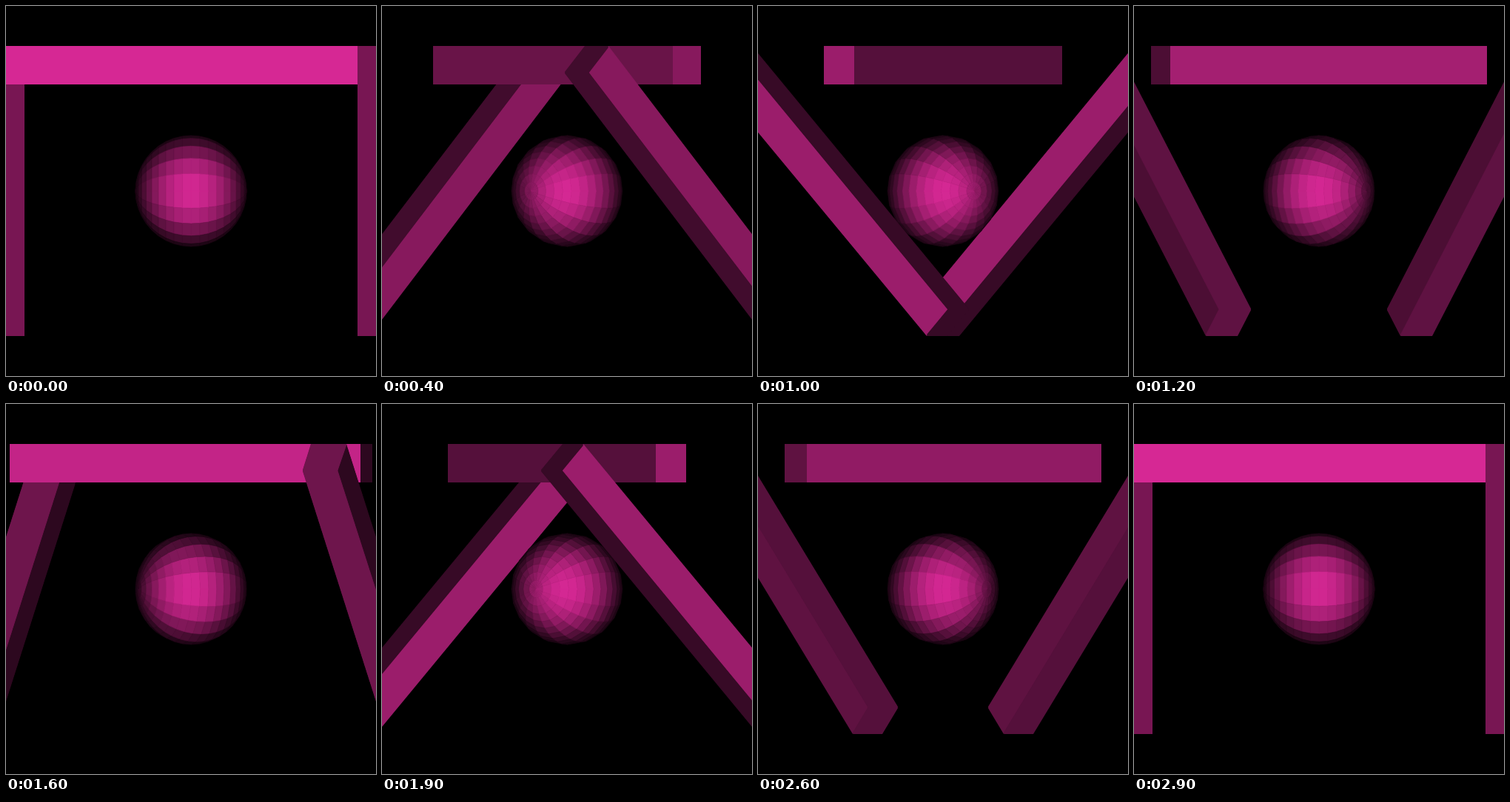
An HTML page with a canvas that plays this animation: 500 by 500 pixels, repeating every 3 s.

```html
<!DOCTYPE html>
<html lang="en">
<head>
<meta charset="utf-8">
<title>Turning bars and sphere</title>
<style>
  html, body { margin: 0; width: 100%; height: 100%; overflow: hidden; background: #000; }
  canvas { display: block; }
</style>
</head>
<body>
<canvas id="stage" width="500" height="500"></canvas>
<script>
const ctx = document.getElementById('stage').getContext('2d');
const FRAMES = 30, STEP = 100;
const MID = 250, LONG = 250, HALF = 25, RADIUS = 75;
const BASE = [214, 40, 148], AMBIENT = 0.12;
const D = Math.SQRT1_2;

// Turn about the vertical axis; z points at the viewer.
const turn = ([x, y, z], a) => {
  const c = Math.cos(a), s = Math.sin(a);
  return [x * c - z * s, y, x * s + z * c];
};
const add = (p, q, k) => p.map((v, i) => v + q[i] * k);
const scale = (p, k) => p.map(v => v * k);

function shade(nz) {
  const k = AMBIENT + (1 - AMBIENT) * nz * nz;
  return `rgb(${BASE.map(v => Math.round(v * k))})`;
}

function trace(points, dy = 0) {
  ctx.beginPath();
  for (const [x, y] of points) ctx.lineTo(x, y + dy);
  ctx.closePath();
}

// A box is a centre with three unit axes and their half sizes.
function drawBox({ centre, axes, sizes }, angle) {
  axes.forEach((axis, i) => {
    for (const side of [-1, 1]) {
      const nz = turn(axis, angle)[2] * side;
      if (nz < 1e-6) continue;
      const j = (i + 1) % 3, k = (i + 2) % 3;
      const mid = add(centre, axis, side * sizes[i]);
      const points = [[-1, -1], [1, -1], [1, 1], [-1, 1]].map(([a, b]) => {
        const p = add(add(mid, axes[j], a * sizes[j]), axes[k], b * sizes[k]);
        const [x, y] = turn(p, angle);
        return [Math.round(MID + x), Math.round(MID + y)];
      });
      ctx.fillStyle = shade(nz);
      for (const dy of [-1, 1, 0]) {
        trace(points, dy);
        ctx.fill();
      }
    }
  });
}

const onSphere = (lat, lon) =>
  [Math.cos(lat), Math.sin(lat) * Math.sin(lon), Math.sin(lat) * Math.cos(lon)];

function drawSphere(angle) {
  const dLat = Math.PI / 20, dLon = Math.PI / 10;
  ctx.lineWidth = 0.7;
  ctx.lineJoin = 'round';
  for (let i = 0; i < 20; i++) {
    for (let j = 0; j < 20; j++) {
      const nz = turn(onSphere((i + 0.5) * dLat, (j + 0.5) * dLon), angle)[2];
      if (nz <= 0) continue;
      const points = [[0, 0], [1, 0], [1, 1], [0, 1]].map(([a, b]) => {
        const p = scale(onSphere((i + a) * dLat, (j + b) * dLon), RADIUS);
        const [x, y] = turn(p, angle);
        return [MID + x, MID + y];
      });
      ctx.fillStyle = ctx.strokeStyle = shade(nz);
      trace(points);
      ctx.fill();
      ctx.stroke();
    }
  }
}

const beam = {
  centre: [0, -170, 0],
  axes: [[1, 0, 0], [0, 1, 0], [0, 0, 1]],
  sizes: [LONG, HALF, HALF]
};
const leg = side => ({
  centre: [side * LONG, 0, 0],
  axes: [[1, 0, 0], [0, -D, side * D], [0, D, side * D]],
  sizes: [HALF, LONG + 0.8, HALF]
});
const left = leg(-1), right = leg(1);

function draw(angle) {
  ctx.fillStyle = '#000';
  ctx.fillRect(0, 0, 500, 500);
  // The leg whose upper half is nearer goes on top.
  const rightNear = Math.sin(angle) + 0.3 * Math.cos(angle) > 0;
  drawBox(rightNear ? left : right, angle);
  drawBox(beam, angle);
  drawSphere(-angle);
  drawBox(rightNear ? right : left, angle);
}

let shown = -1;
function tick() {
  const step = Math.floor(performance.now() / STEP) % FRAMES;
  if (step !== shown) {
    shown = step;
    draw(step / (FRAMES - 1) * 2 * Math.PI);
  }
  requestAnimationFrame(tick);
}
tick();
</script>
</body>
</html>
```
